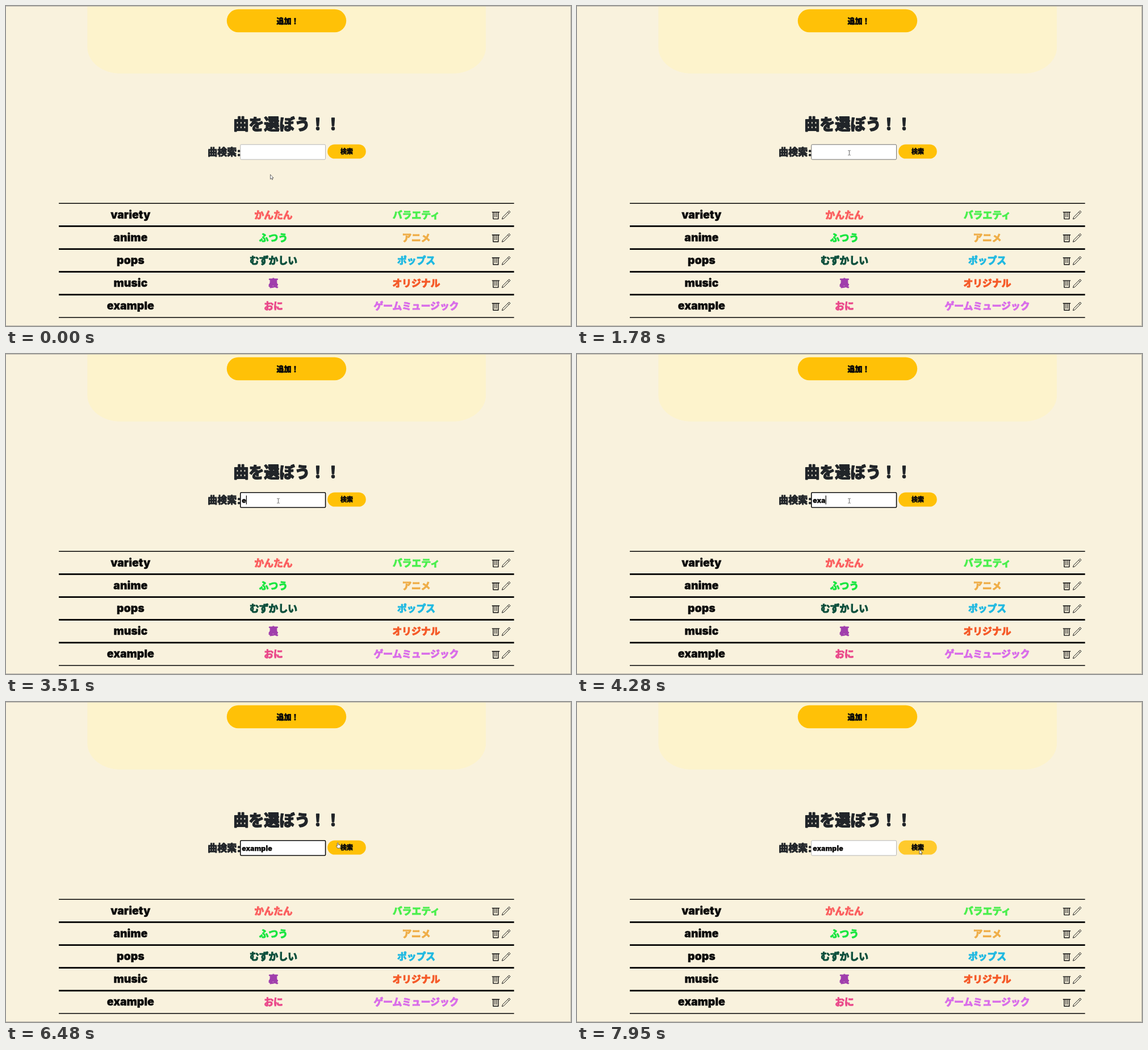
An HTML page that plays this animation: 995x563 px, repeating every 8000 ms.

```html
<!DOCTYPE html>
<html lang="ja">
<head>
<meta charset="utf-8">
<title>曲を選ぼう</title>
<style>
  html, body { margin: 0; width: 100%; height: 100%; overflow: hidden; background: #f9f2dd; }
  svg { display: block; width: 995px; height: 563px; }
  text { font-weight: 900; white-space: pre; }
  .ja { font-family: "Noto Sans CJK JP", "Noto Sans CJK", sans-serif; stroke: currentColor; fill: currentColor; stroke-width: .065em; stroke-linejoin: round; }
  .en { font-family: Inter, Roboto, sans-serif; fill: #0a0a0a; stroke: #0a0a0a; stroke-width: .02em; }
</style>
</head>
<body>
<svg id="stage" viewBox="0 0 995 563" xmlns="http://www.w3.org/2000/svg">
  <rect width="995" height="563" fill="#f9f2dd"/>
  <rect x="143.3" y="-100" width="701.8" height="218.7" rx="58" ry="46" fill="#fdf3cc"/>
  <path d="M0 .5H994.5V562.5H0" fill="none" stroke="#b9b5aa"/>
  <rect x="388.8" y="5.8" width="210.4" height="40.4" rx="20.2" fill="#ffc107"/>
  <rect id="button" x="566.2" y="243.4" width="67.6" height="25.2" rx="12.6" fill="#ffc107"/>
  <rect id="field" x="412.8" y="243.8" width="149.8" height="26.2" rx="1.6" fill="#fff"/>
  <g id="page"></g>
  <text id="typed" class="en" x="415.2" y="261.6" font-size="12.5"></text>
  <path id="caret" d="M0 249V264.5" stroke="#000" stroke-width="1.2"/>
  <g id="arrow"><path d="M0 0V8.2L1.9 6.5L3.1 9.2L4.4 8.6L3.2 6H5.6Z" fill="#fff" stroke="#333" stroke-width=".7"/></g>
  <g id="beam"><path d="M-2.3 -4H-.6L0 -3.5L.6 -4H2.3M0 -3.5V3.5M-2.3 4H-.6L0 3.5L.6 4H2.3" fill="none" stroke="#444" stroke-width=".8"/></g>
  <g id="hand"><path d="M-.9 .7Q0 -.7 .9 .7V3.4L4 4.1Q5 4.4 4.8 5.8L4 9.5H-.4L-2.6 6.2Q-2.8 4.9 -1.7 5.2L-.9 6Z" fill="#fff" stroke="#333" stroke-width=".7"/></g>
</svg>
<script>
const $ = id => document.getElementById(id);
const page = $('page');

function add(name, attrs, text = '') {
  const node = document.createElementNS('http://www.w3.org/2000/svg', name);
  for (const key in attrs) node.setAttribute(key, attrs[key]);
  node.textContent = text;
  page.append(node);
}

// Japanese text centred on (x, y)
const ja = (text, x, y, size, color = '#0a0a0a') => add('text', {
  class: 'ja', x, y: y + size * .38, 'font-size': size, 'text-anchor': 'middle', color
}, text);

ja('追加！', 496, 26.5, 13);
ja('曲を選ぼう！！', 495, 207.5, 27, '#212529');
ja('曲検索', 380.7, 256.8, 17, '#212529');
ja(':', 410.3, 257.2, 18, '#212529');
ja('検索', 600, 256.2, 11);

const rows = [
  ['variety', 'かんたん', '#fb6060', 'バラエティ', '#4bef4e'],
  ['anime', 'ふつう', '#19e640', 'アニメ', '#efae48'],
  ['pops', 'むずかしい', '#0c4f3c', 'ポップス', '#21b9e1'],
  ['music', '裏', '#a03eac', 'オリジナル', '#f55a29'],
  ['example', 'おに', '#ea4a8b', 'ゲームミュージック', '#d96de9']
];
const pitch = 40.17;

rows.forEach(([name, level, levelColor, genre, genreColor], i) => {
  const y = 367.4 + i * pitch;
  add('text', { class: 'en', x: 219.3, y: y + 6.3, 'font-size': 19.4, 'text-anchor': 'middle' }, name);
  ja(level, 471, y, 16.8, levelColor);
  ja(genre, 722.5, y, 16.8, genreColor);
  const icon = (d, width) => add('path', {
    d, transform: `translate(0 ${y})`, fill: 'none', stroke: '#111', 'stroke-width': width, 'stroke-linejoin': 'round'
  });
  icon('M855.8 -4.8H869.2M858 -4.8V7.2H867V-4.8', 1.4);
  icon('M861 -4.8V4.4M864 -4.8V4.4', 1.1);
  icon('M873.6 7.6L874.6 4.2L885.9 -7.1L888 -5L876.7 6.5ZM883.6 -4.8L885.7 -2.7', .95);
});

for (let i = 0; i <= rows.length; i++) {
  const outer = i % rows.length === 0;
  add('path', { d: `M93 ${347.2 + i * pitch}H894.7`, stroke: '#000', 'stroke-width': outer ? 1.4 : 2.7 });
}

// [time, value] tables; each value holds until the next entry
const pointer = [
  [0, ['arrow', 465.5, 296.5]], [1470, ['arrow', 470.5, 264]], [1650, ['beam', 477.5, 260]],
  [1780, ['beam', 479.5, 258.3]], [6220, ['beam', 508, 254]], [6350, ['beam', 549, 250]],
  [6480, ['hand', 584.3, 247.6]], [6600, ['hand', 598, 256]], [6730, ['hand', 602.8, 259.5]],
  [7950, ['arrow', 603, 259.5]]
];
const letters = [[0, 0], [3510, 1], [4030, 2], [4280, 3], [4820, 4], [5230, 5], [5350, 6], [5650, 7]];
const caretOn = [[0, 0], [2590, 1], [3110, 0], [3510, 1], [6220, 0], [6730, 1], [7270, 0]];
const border = [[0, ['#b5b5b5', 1]], [1650, ['#6f6f6f', 1]], [2590, ['#0c0c0c', 1.6]], [7800, ['#b5b5b5', 1]]];
const buttonColor = [[0, '#ffc107'], [6600, '#ffc61c'], [6730, '#ffca2c']];
const caretX = [416, 423.4, 430.6, 438.3, 449.5, 458.5, 461.6, 469.4];

const at = (table, time) => table.findLast(([start]) => start <= time)[1];

function draw(time) {
  const count = at(letters, time);
  $('typed').textContent = 'example'.slice(0, count);
  $('caret').setAttribute('transform', `translate(${caretX[count]} 0)`);
  $('caret').setAttribute('opacity', at(caretOn, time));

  const [stroke, width] = at(border, time);
  $('field').setAttribute('stroke', stroke);
  $('field').setAttribute('stroke-width', width);
  $('button').setAttribute('fill', at(buttonColor, time));

  const [shape, x, y] = at(pointer, time);
  for (const id of ['arrow', 'beam', 'hand']) $(id).style.display = id === shape ? '' : 'none';
  $(shape).setAttribute('transform', `translate(${x} ${y})`);
}

const begin = performance.now();
function tick() {
  draw((performance.now() - begin) % 8000);
  requestAnimationFrame(tick);
}
tick();
</script>
</body>
</html>
```
